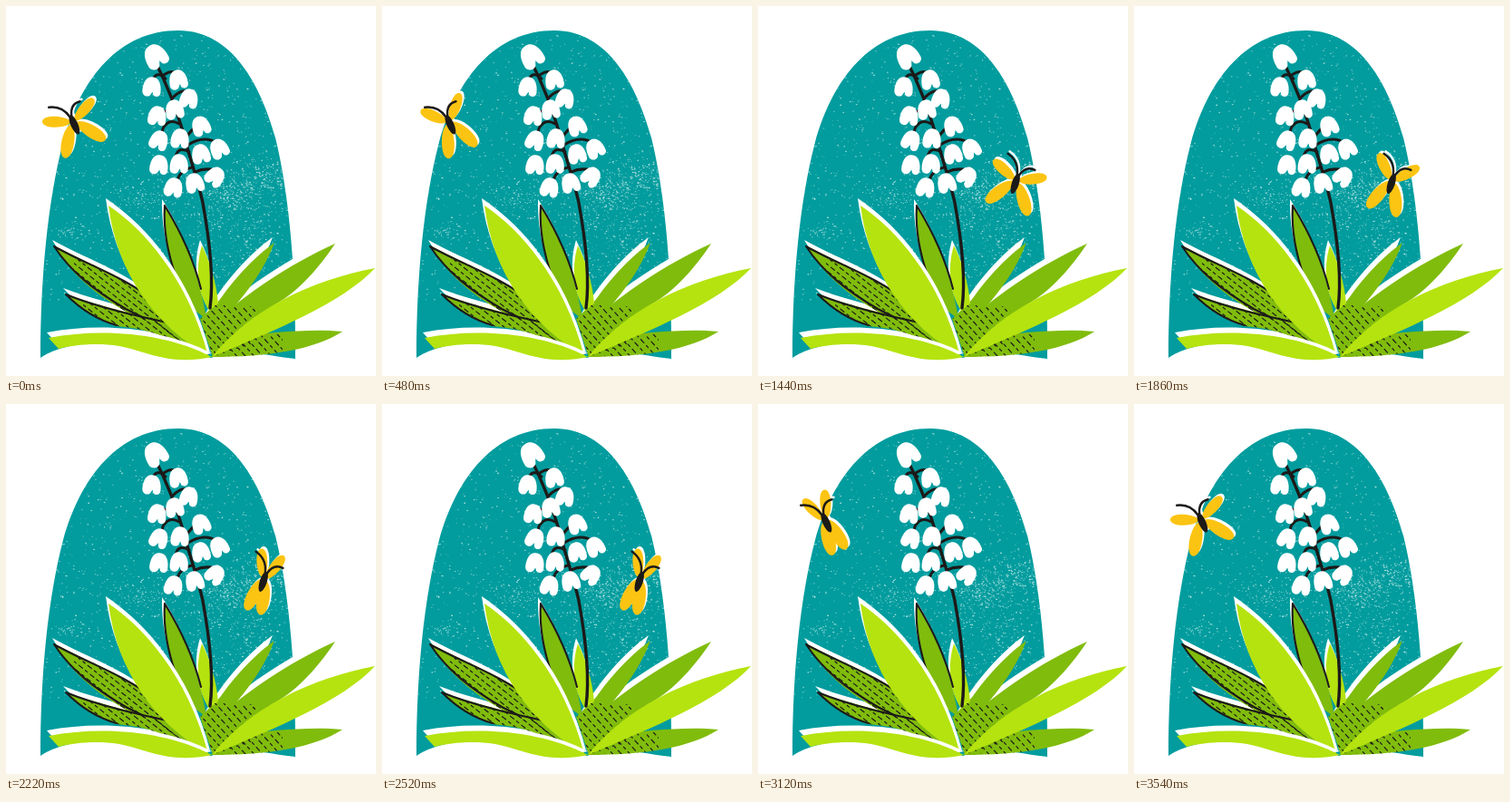
An HTML page with a canvas for the animation above (3600 ms loop, 408 by 408 pixels).

```html
<!DOCTYPE html>
<html lang="en">
<head>
<meta charset="utf-8">
<title>Butterfly and flower</title>
<style>
html, body { margin: 0; width: 100%; height: 100%; overflow: hidden; background: #fff; }
canvas { display: block; width: 408px; height: 408px; }
</style>
</head>
<body>
<canvas id="stage"></canvas>
<script>
const SIZE = 408, LOOP = 3600, FLAP = 300;
const TEAL = '#029c9e', LIME = '#b5e30f', GREEN = '#80bc0c', INK = '#1c1a19', YELLOW = '#fcc412';
const dpr = window.devicePixelRatio || 1;

function prepare(canvas) {
  canvas.width = canvas.height = SIZE * dpr;
  const c = canvas.getContext('2d');
  c.scale(dpr, dpr);
  c.lineCap = c.lineJoin = 'round';
  return c;
}

const ctx = prepare(document.getElementById('stage'));
const scene = document.createElement('canvas');
const bg = prepare(scene);

let seed = 20;
function rnd() {
  seed = (seed * 1664525 + 1013904223) % 4294967296;
  return seed / 4294967296;
}
const gauss = () => rnd() + rnd() + rnd() + rnd() - 2;

const arch = new Path2D('M38 388C38 300 46 215 63 150C83 79 125 27 190 27C250 27 281 88 297 145C313 210 320 300 319 389C295 387 262 376 226 388C150 365 70 365 38 388Z');
const leaves = {
  back: 'M174 219C192 246 212 290 221 345L200 330C185 295 173 260 174 219Z',
  left: 'M53 264C92 286 146 303 176 337L221 384C195 372 172 356 150 346C108 326 74 300 53 264Z',
  leftLow: 'M65 317C100 331 150 341 184 351L222 386C180 366 160 356 122 353C98 345 78 332 65 317Z',
  small: 'M216 264C225 282 232 305 234 328L224 336C212 318 208 290 216 264Z',
  right: 'M296 261C284 292 268 312 250 334L228 386L222 345C238 318 264 284 296 261Z',
  rightBig: 'M363 262C340 296 318 318 292 332L228 387L238 342C265 318 310 286 363 262Z',
  rightLow: 'M371 359C340 379 290 387 226 387L262 362C290 362 330 355 371 359Z',
  spear: 'M407 289C370 328 300 356 227 387C270 334 335 303 407 289Z',
  big: 'M113 220C150 245 200 298 223 386C165 353 122 295 113 220Z',
  ground: 'M47 366C105 355 175 360 227 387C180 397 155 381 125 375C98 371 74 374 58 378Z'
};
for (const k in leaves) leaves[k] = new Path2D(leaves[k]);
const tuft = new Path2D('M214 345L238 322L252 332L290 330L262 364L290 366L228 387Z');

function fill(c, path, color, dx = 0, dy = 0) {
  c.save();
  c.translate(dx, dy);
  c.fillStyle = color;
  c.fill(path);
  c.restore();
}

function ink(c, d, width) {
  c.strokeStyle = INK;
  c.lineWidth = width;
  c.stroke(new Path2D(d));
}

// Printed grain: even dust plus a few worn patches
function grain() {
  bg.save();
  bg.clip(arch);
  const dot = (x, y) => {
    const s = 0.4 + rnd() * 0.9;
    bg.globalAlpha = 0.35 + rnd() * 0.5;
    bg.fillRect(x, y, s + rnd() * 0.6, s);
  };
  bg.fillStyle = '#e4f6f3';
  for (let i = 0; i < 1300; i++) dot(35 + rnd() * 285, 25 + rnd() * 300);
  const patches = [[255, 215, 50, 38, 420], [290, 188, 24, 16, 180], [150, 215, 36, 20, 140],
    [72, 248, 14, 8, 45], [255, 268, 55, 30, 130], [240, 205, 22, 14, 120]];
  for (const [x, y, w, h, n] of patches)
    for (let i = 0; i < n; i++) dot(x + gauss() * w, y + gauss() * h);
  bg.restore();
}

// Broken diagonal strokes inside a leaf
function hatch(path, x0, x1, y0, y1, slope) {
  bg.save();
  bg.clip(path);
  bg.beginPath();
  bg.rect(x0, y0, x1 - x0, y1 - y0);
  bg.clip();
  bg.strokeStyle = INK;
  bg.lineWidth = 1.2;
  bg.setLineDash([5, 4, 3, 4]);
  const run = (y1 - y0) / slope;
  for (let x = x0 - run; x < x1; x += 9.5) {
    bg.lineDashOffset = rnd() * 12;
    bg.beginPath();
    bg.moveTo(x, y0);
    bg.lineTo(x + run, y1);
    bg.stroke();
  }
  bg.restore();
}

function plant() {
  const L = leaves;
  for (const k in L) if (k !== 'rightLow' && k !== 'big') fill(bg, L[k], '#fff', -2, -6);
  fill(bg, L.big, '#fff', -3, -8);
  for (const k of ['back', 'right', 'rightBig', 'left', 'leftLow', 'rightLow']) fill(bg, L[k], GREEN);
  fill(bg, tuft, GREEN);
  fill(bg, L.small, LIME);
  hatch(L.left, 75, 215, 280, 375, 0.8);
  hatch(L.leftLow, 85, 210, 320, 375, 0.8);
  hatch(tuft, 215, 275, 330, 386, 1.1);
  hatch(L.rightLow, 245, 305, 362, 386, 1.1);
  ink(bg, 'M53 265C88 285 130 298 165 326M53 265C72 294 98 314 132 334L150 343', 2.1);
  ink(bg, 'M66 318C100 332 145 342 182 350M66 318C82 334 100 346 122 352', 2.1);
  ink(bg, 'M175 220C191 246 207 280 215 312M175 220C173 250 179 275 188 300', 2.1);
  fill(bg, L.spear, LIME);
  fill(bg, L.big, '#fff', 2, -4);
  fill(bg, L.big, LIME);
  fill(bg, L.ground, '#fff', 0, -4);
  fill(bg, L.ground, LIME);
}

function flower() {
  ink(bg, 'M165 62C177 86 186 108 194 135C202 166 211 190 217 217C223 250 230 295 225 333', 3.4);
  ink(bg, 'M176 80Q167 72 163 79M174 76Q182 70 188 74M184 101Q194 91 200 95M188 117Q180 116 170 116' +
    'M191 130Q180 123 173 135L172 141M196 148Q207 133 214 130M201 153Q218 142 233 151' +
    'M202 161Q190 154 187 166M205 178Q192 181 189 192M208 183Q220 178 230 181', 3);
  const bell = new Path2D('M-1-10C6-11 10-3 9.5 6C9 10 4 11 2 8L1 5L-1 9C-4 12-9 10-9.5 6C-10-3-7-10-1-10Z');
  const bells = [[165, 55, -28, 1.3], [190, 81, -8], [161, 89, 6], [202, 102, 14], [167, 121, 10], [186, 114, -8],
    [215, 132, -18], [169, 148, 22], [192, 146, 6], [235, 157, -24], [215, 163, -10], [169, 175, 8],
    [191, 174, 4], [231, 188, 40], [208, 195, -12], [185, 200, 14]];
  bg.fillStyle = '#fff';
  for (const [x, y, turn, k = 1.06] of bells) {
    bg.save();
    bg.translate(x, y);
    bg.rotate(turn * Math.PI / 180);
    bg.scale(k, k);
    bg.fill(bell);
    bg.restore();
  }
}

function wing(x, y, deg, len, w, color) {
  ctx.save();
  ctx.translate(x, y);
  ctx.rotate(deg * Math.PI / 180);
  ctx.beginPath();
  ctx.moveTo(0, 0);
  ctx.bezierCurveTo(len * 0.12, -w, len, -w * 1.15, len, 0);
  ctx.bezierCurveTo(len, w * 1.15, len * 0.12, w, 0, 0);
  ctx.fillStyle = color;
  ctx.fill();
  ctx.restore();
}

const feelers = new Path2D('M-1-9Q-4-24-18-28M1-9Q5-22 16-20');

function butterfly(x, y, turn, open) {
  const upper = 20 + 56 * open, lower = 8 + 33 * open;
  const layer = (dx, dy, wings, body) => {
    ctx.save();
    ctx.translate(x + dx, y + dy);
    ctx.rotate(turn * Math.PI / 180);
    for (const s of [-1, 1]) {
      wing(s * 3, -1, 90 - s * lower, 38, 8.6, wings);
      wing(s * 2, -3, -90 + s * upper, 32, 7.4, wings);
    }
    ctx.strokeStyle = ctx.fillStyle = body;
    ctx.lineWidth = 2.4;
    ctx.stroke(feelers);
    ctx.beginPath();
    ctx.ellipse(0, 1, 4, 11.5, 0, 0, 7);
    ctx.fill();
    ctx.restore();
  };
  layer(2, -2.5, '#fff', '#fff');
  layer(0, 0, YELLOW, INK);
}

// Wings are fully shut at 120 ms of each beat and fully open at 270 ms
function openness(t) {
  const d = Math.abs(t % FLAP - 120);
  return Math.min(d, FLAP - d) / (FLAP / 2);
}

function draw(t) {
  const away = t >= 780 && t < 2700;
  const step = away ? 30 : 60;
  const open = openness(Math.floor(t / step) * step);
  ctx.clearRect(0, 0, SIZE, SIZE);
  ctx.drawImage(scene, 0, 0, SIZE, SIZE);
  if (away) butterfly(284, 195, 18, open);
  else butterfly(75, 130, -24, open);
}

bg.fillStyle = '#fff';
bg.fillRect(0, 0, SIZE, SIZE);
fill(bg, arch, TEAL);
grain();
plant();
flower();

const start = performance.now();
function tick() {
  draw((performance.now() - start) % LOOP);
  requestAnimationFrame(tick);
}
tick();
</script>
</body>
</html>
```
